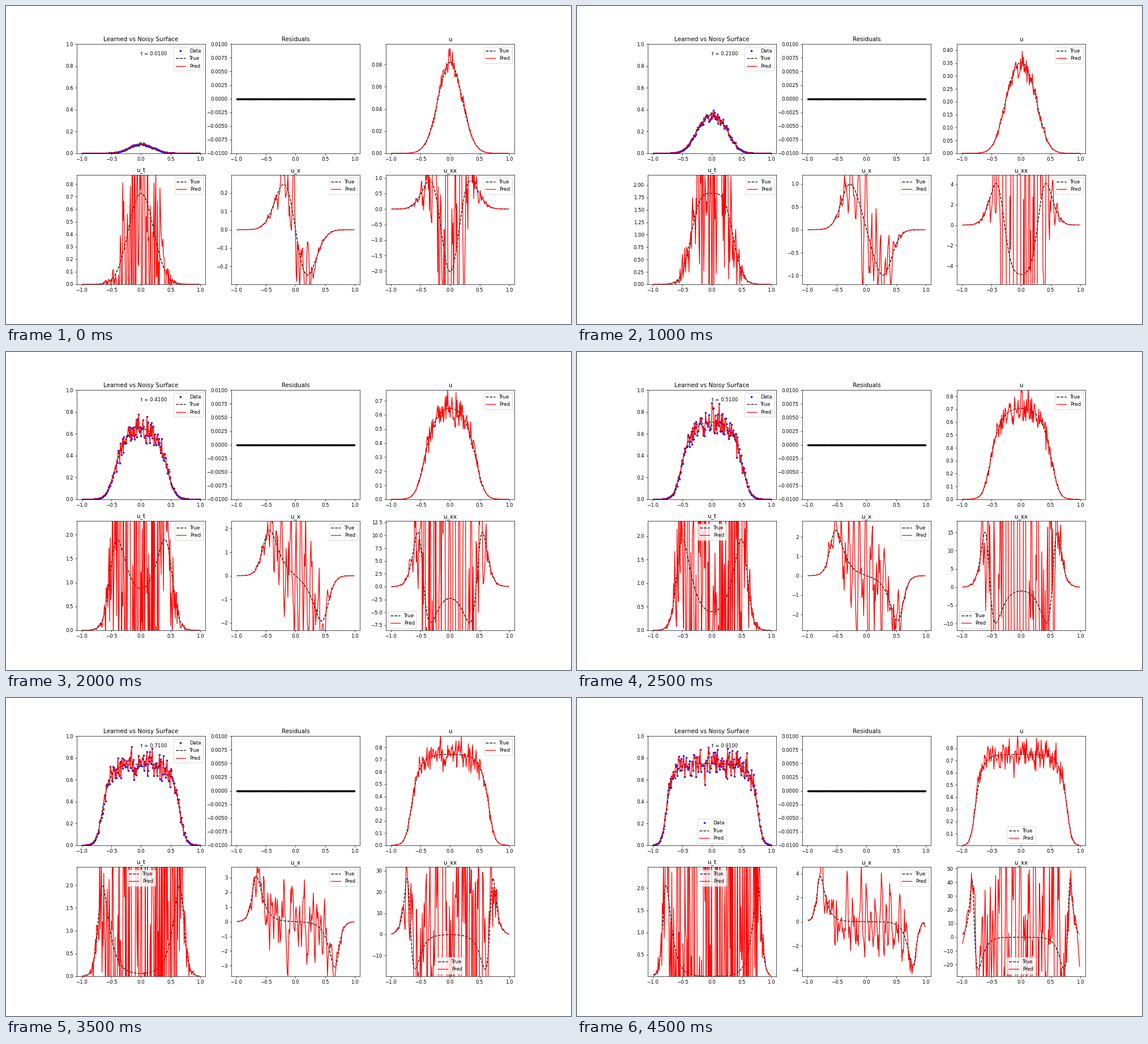
A matplotlib script that plays this animation: 998 px wide and 561 px high, repeating every 5 s.

```python
import numpy as np
import matplotlib.pyplot as plt
from matplotlib.animation import FuncAnimation

W, H, DPI = 998, 561, 62.375
FRAMES, INTERVAL = 10, 500

# Growth with density dependent spreading: u_t = D (u u_x)_x + R u (1 - u / K)
D, R, K = 0.02, 10.0, 0.75
DX, DT = 0.0025, 1e-4
GRID = np.linspace(-1, 1, 801)
PICK = slice(4, -4, 4)
X = GRID[PICK]
TIMES = [0.01 + 0.1 * i for i in range(FRAMES)]


def rate(u):
    flux = np.zeros(u.size + 1)
    flux[1:-1] = D * 0.5 * (u[1:] + u[:-1]) * np.diff(u) / DX
    return np.diff(flux) / DX + R * u * (1 - u / K)


def solve():
    """True u, u_t, u_x and u_xx at the sample points for each time."""
    u = 0.075 * np.exp(-GRID**2 / (2 * 0.2**2))
    out, step = [], 0
    for t in TIMES:
        while step < round(t / DT):
            u = u + DT * rate(u)
            step += 1
        u_x = np.gradient(u, DX)
        u_xx = np.zeros_like(u)
        u_xx[1:-1] = np.diff(u, 2) / DX**2
        out.append([v[PICK] for v in (u, rate(u), u_x, u_xx)])
    return out


def local_derivatives(y, width=11):
    """First and second derivative from cubic fits in a sliding window."""
    n = y.size
    k = np.arange(width) - width // 2
    fit = np.linalg.pinv(np.vander(k, 4, increasing=True))
    mid = np.clip(np.arange(n), width // 2, n - 1 - width // 2)
    c = fit @ y[mid[:, None] + k].T
    s = np.arange(n) - mid
    h = X[1] - X[0]
    return ((c[1] + 2 * c[2] * s + 3 * c[3] * s**2) / h,
            (2 * c[2] + 6 * c[3] * s) / h**2)


def predict(i, true):
    rng = np.random.default_rng(40 + i)
    level = 0.07 if i == 0 else 0.095
    u = true[0] * (1 + level * np.clip(rng.standard_normal(X.size), -2.7, 2.7))
    # the time derivative is one-sided, hence noisier, at the first step
    spread = 12 if i == 0 else 4.5
    u_t = true[1] + spread * true[0] * rng.standard_normal(X.size)
    return [u, u_t, *local_derivatives(u)]


TRUE = solve()
PRED = [predict(i, v) for i, v in enumerate(TRUE)]

UR, UL, UC = "upper right", "upper left", "upper center"
LL, LR, LC = "lower left", "lower right", "lower center"
U_LOC = [UR] * 8 + [UL, LC]
LEGENDS = [
    U_LOC,
    [UR] * 5 + [UC] * 3 + [LC, UC],
    [UR] * 10,
    [UR] * 4 + [LL, LL, LR] + [LC] * 3,
]
NAMES = ["u", "u_t", "u_x", "u_xx"]

plt.rcParams["figure.subplot.bottom"] = 0.125
fig, axes = plt.subplots(2, 3, figsize=(W / DPI, (H + 0.001) / DPI), dpi=DPI,
                         facecolor="white")
surface, residual, *panels = axes.flat


def draw_pair(ax, true, pred):
    ax.plot(X, true, "k--", label="True")
    ax.plot(X, pred, "r-", label="Pred")


def limits(y):
    """Limits 1.2 times the data; a bottom within half a pixel of 0 is 0."""
    low, high = 1.2 * y.min(), 1.2 * y.max()
    return (0 if abs(low) < high / 385 else low), high


def update(i):
    for ax in axes.flat:
        ax.cla()
        ax.set_xlim(-1.089, 1.089)
    true, pred = TRUE[i], PRED[i]

    surface.plot(X, pred[0], "b.", label="Data")
    draw_pair(surface, true[0], pred[0])
    surface.text(0, 0.9, f"t = {TIMES[i]:.4f}")
    surface.set_ylim(0, 1)
    surface.set_title("Learned vs Noisy Surface")
    surface.legend(loc=U_LOC[i])

    residual.plot(X, np.zeros_like(X), "k.")
    residual.set_ylim(-0.01, 0.01)
    residual.set_title("Residuals")

    for ax, name, a, b, locs in zip(panels, NAMES, true, pred, LEGENDS):
        draw_pair(ax, a, b)
        ax.set_ylim(*limits(a))
        ax.set_title(name)
        ax.legend(loc=locs[i])
    return []


anim = FuncAnimation(fig, update, frames=FRAMES, interval=INTERVAL,
                     repeat=True, repeat_delay=0, blit=False)
plt.show()
```
